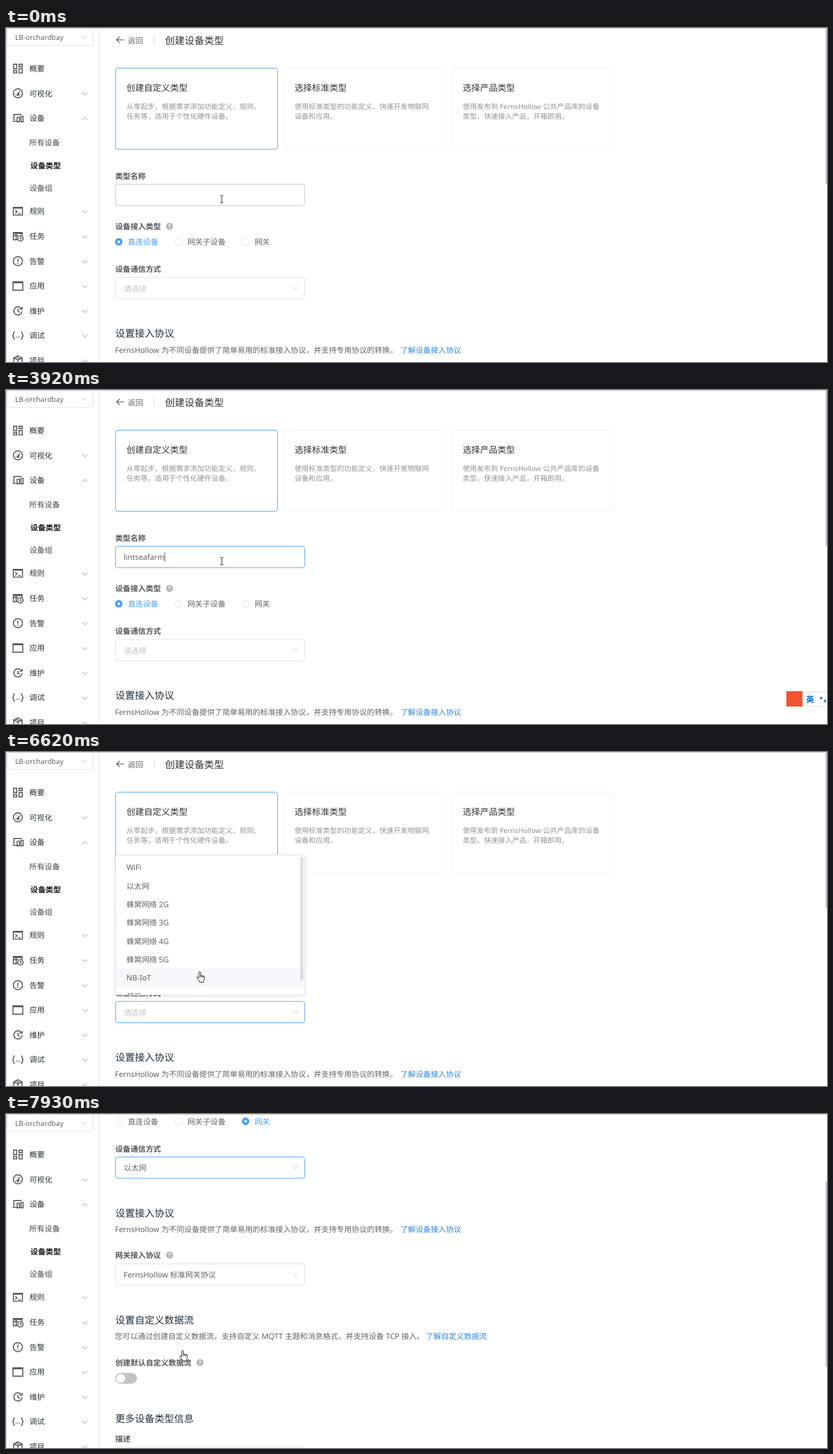
An HTML page for the animation above (8000 ms loop, 1172 by 478 pixels).

```html
<!DOCTYPE html>
<html lang="zh-CN">
<head>
<meta charset="utf-8">
<title>创建设备类型</title>
<style>
html, body { margin: 0; width: 100%; height: 100%; overflow: hidden; background: #fff; }
svg { display: block; width: 1172px; height: 478px; }
text { font-family: "Noto Sans", "Noto Sans CJK SC", "Noto Sans CJK", sans-serif; text-rendering: geometricPrecision; white-space: pre; }
</style>
</head>
<body>
<svg id="stage" viewBox="0 0 1172 478" xmlns="http://www.w3.org/2000/svg"></svg>
<script>
const LOOP = 8000;
const BLUE = '#409eff', LINK = '#2f86e0', TEXT = '#606266', DARK = '#303133';
const MUTED = '#8f9297', PALE = '#c0c4cc', LINE = '#dcdfe6';
const SIZE = 10.89;
const NAME = 'lintseafarm';
const BRAND = 'FernsHollow';

// Moments at which the screen refreshes.
const TICKS = [0, 150, 280, 580, 1180, 1330, 1480, 1760, 2060, 2650, 3090, 3370, 3510, 3800, 3920,
  4540, 4690, 4840, 4990, 5150, 5300, 5460, 5610, 5760, 5910, 6190, 6330, 6480, 6620, 6770, 6910,
  7060, 7200, 7350, 7480, 7630, 7780, 7930];

// Vertically centred text.
const text = (x, cy, str, { size = SIZE, fill = TEXT, bold = false, id = '' } = {}) =>
  `<text ${id && `id="${id}"`} x="${x}" y="${cy + size * 0.38}" font-size="${size}" fill="${fill}"${bold ? ' font-weight="700"' : ''}>${str}</text>`;
const label = (cy, str) => text(156, cy, str, { bold: true, fill: '#55575c' });
const heading = (cy, str) => text(156, cy, str, { size: 14, fill: '#1f2f3d' });
const link = (x, cy, str) => text(x, cy, str, { fill: LINK });
const box = (x, y, w, h, stroke, id = '', r = 3) =>
  `<rect ${id && `id="${id}"`} x="${x}" y="${y}" width="${w}" height="${h}" rx="${r}" fill="#fff" stroke="${stroke}" stroke-width=".85"/>`;
const chevron = (x, y, up = false, color = MUTED, id = '') =>
  `<path ${id && `id="${id}"`} d="M-3.7 -1.8L0 1.8L3.7 -1.8" transform="translate(${x} ${y}) scale(1 ${up ? -1 : 1})" fill="none" stroke="${color}" stroke-width=".9"/>`;
const help = (x, y) => `<circle cx="${x}" cy="${y}" r="5" fill="#b4b5b8"/>` +
  `<text x="${x}" y="${y + 3}" font-size="8" font-weight="700" fill="#fff" text-anchor="middle">?</text>`;

function card(x, title, lines, active) {
  return box(x, 57.5, 231.3, 116.2, active ? '#4a9ff0' : '#f0f1f4') +
    text(x + 15.7, 85.5, title, { size: 12.44, fill: DARK }) +
    lines.map((s, i) => text(x + 15.7, 112 + i * 14.3, s, { size: 10.11, fill: MUTED })).join('');
}

const radios = [[161, '直连设备'], [246, '网关子设备'], [342, '网关']];
const radio = ([x, str], i) =>
  `<circle id="ring${i}" cx="${x}" cy="306" r="5" stroke-width=".85"/><circle id="dot${i}" cx="${x}" cy="306" r="2" fill="#fff"/>` +
  text(x + 13, 306, str, { id: `choice${i}` });

// Sidebar icons, centred on the origin.
const icons = {
  board: '<path d="M-6.2 -6.2h4.6v6.4h-4.6zM-6.2 3h4.6v3.4h-4.6zM1.6 -6.2h4.6v3.4h-4.6zM1.6 0h4.6v6.4h-4.6z"/>',
  gauge: '<circle r="6.5"/><path d="M-4 1.5h.8M3.2 1.5h.8M-2.6 -2.6l.5 .5M0 -4v.6M2.8 -2.8L0 1.5" /><circle cy="2" r="1.3"/>',
  devices: '<path d="M5.5 -5.2H-5.7V3.5M-7.5 4.6H-1.5M-1 -1.4H2.4V5.3H-1zM4.4 -2.6H7.4V5.3H4.4z"/>',
  console: '<path d="M-6.5 -5.6H6.5V5.6H-6.5zM-6.5 -4.5H6.5M-3.8 -1.6L-1.2 .8L-3.8 3.2M.5 3.3H4"/>',
  schedule: '<path d="M6 -1V-5.2H-6.5V5H-1M-6.5 -4H6M-6.5 -1H0M-2.5 -5V5"/><circle cx="3.5" cy="3" r="3.9" fill="#fff"/><path d="M3.5 .8V3.2L5.1 4.2"/>',
  alert: '<circle r="6.5"/><path d="M0 -3.6V1M0 2.4V3.9"/>',
  window: '<path d="M-7 -6H7V6H-7zM-7 -4.6H7"/>',
  upkeep: '<path d="M4.4 -3.9A5.9 5.9 0 1 0 5.9 .8M6 -6V-2.6H2.4M0 -3V.6L2.6 2"/>',
  braces: '<path d="M-4.5 -5.6C-7 -5.6 -5.4 -.4 -7.8 0C-5.4 .4 -7 5.6 -4.5 5.6M4.5 -5.6C7 -5.6 5.4 -.4 7.8 0C5.4 .4 7 5.6 4.5 5.6M-3 2.2h1.2M-.6 2.2h1.2M1.8 2.2h1.2"/>',
  cube: '<path d="M0 -6.6L6 -3.6V3.6L0 6.6L-6 3.6V-3.6zM-6 -3.6L0 -.6L6 -3.6M0 -.6V6.6M-3 -5.1L3 -2.1"/>'
};
const menu = [['board', '概要', 58], ['gauge', '可视化', 93.5], ['devices', '设备', 129], ['console', '规则', 262.3],
  ['schedule', '任务', 298], ['alert', '告警', 333.7], ['window', '应用', 369.2], ['upkeep', '维护', 404.8],
  ['braces', '调试', 440.2], ['cube', '项目', 475.7]];

const sidebar = `<rect width="132" height="478" fill="#fff"/><path d="M132.5 0V478" stroke="#e4e5e8"/>` +
  box(1.5, -6.5, 123, 31.5, LINE) +
  text(13, 13, 'LB-orchardbay', { size: 10.11 }) + chevron(111.5, 13, false, PALE) +
  menu.map(([icon, str, y]) =>
    `<g transform="translate(17 ${y})" fill="none" stroke="#505257" stroke-width="1.4">${icons[icon]}</g>` +
    text(33.5, y, str, { fill: '#25302f' }) +
    (icon === 'board' ? '' : chevron(112.5, y + 0.7, icon === 'devices'))).join('') +
  text(33.3, 164, '所有设备', { fill: '#45474c' }) +
  text(34.8, 197, '设备类型', { fill: '#16191d', bold: true }) +
  text(33.5, 229, '设备组', { fill: '#45474c' });

const options = ['WiFi', '以太网', '蜂窝网络 2G', '蜂窝网络 3G', '蜂窝网络 4G', '蜂窝网络 5G', 'NB-IoT', '蓝牙'];
const optionY = i => 165.3 + i * 26.3;
const dropdown = `<g id="dropdown">
  <rect x="156.5" y="147.5" width="270" height="200" rx="3" fill="#fff" stroke="#e4e7ed" filter="url(#shadow)"/>
  <g clip-path="url(#panel)"><rect id="hover" x="157" width="269" height="26.3" fill="#f5f7fa"/>
  ${options.map((s, i) => text(172, optionY(i), s)).join('')}</g>
  <rect x="420" y="150" width="4.5" height="177" rx="2.2" fill="#dddee1"/></g>`;

const page = `<g id="page">
  <path d="M168 17H158M162.3 12.6L157.9 17L162.3 21.4" fill="none" stroke="#505257" stroke-width="1.1"/>
  ${text(174, 17.5, '返回')}
  <path d="M211.5 11V23.5" stroke="${LINE}"/>
  ${text(227, 17.5, '创建设备类型', { size: 14, fill: DARK })}
  ${card(156.3, '创建自定义类型', ['从零起步，根据需求添加功能定义、规则、', '任务等，适用于个性化硬件设备。'], true)}
  ${card(396.2, '选择标准类型', ['使用标准类型的功能定义，快速开发物联网', '设备和应用。'])}
  ${card(636.2, '选择产品类型', [`使用发布到 ${BRAND} 公共产品库的设备`, '类型，快速接入产品，开箱即用。'])}
  ${label(212, '类型名称')}
  ${box(156.3, 223.6, 270, 30.6, LINE, 'nameBox')}
  ${text(168, 239.3, '', { id: 'typed' })}
  <rect id="caret" y="232.5" width="1" height="13" fill="#55575c"/>
  ${label(284, '设备接入类型')}${help(233.5, 284)}
  ${radios.map(radio).join('')}
  ${label(345, '设备通信方式')}
  ${box(156.3, 357, 270, 30.5, LINE, 'linkBox')}
  ${text(168, 372.5, '', { id: 'linkValue' })}
  ${chevron(413.5, 372.3, false, PALE, 'linkArrow')}
  ${heading(436.8, '设置接入协议')}
  ${text(155.5, 460.7, `${BRAND} 为不同设备提供了简单易用的标准接入协议，并支持专用协议的转换。`)}
  ${link(563, 460.7, '了解设备接入协议')}
  ${label(497.8, '网关接入协议')}${help(233.5, 497.5)}
  ${box(156.3, 510, 270, 30.5, LINE)}
  ${text(168, 525.7, `${BRAND} 标准网关协议`)}${chevron(413.5, 525.5, false, PALE)}
  ${heading(590.2, '设置自定义数据流')}
  ${text(155.5, 613.7, '您可以通过创建自定义数据流，支持自定义 MQTT 主题和消息格式，并支持设备 TCP 接入。')}
  ${link(599.5, 613.7, '了解自定义数据流')}
  ${label(651.7, '创建默认自定义数据流')}${help(277, 651.3)}
  <rect x="156" y="666" width="31" height="15.5" rx="7.75" fill="#c0c1c4"/><circle cx="163.8" cy="673.75" r="6.3" fill="#fff"/>
  ${heading(731, '更多设备类型信息')}
  ${label(760, '描述')}
  ${box(156.3, 772, 270, 60, LINE)}
</g>`;

const ime = `<g id="ime"><rect x="1128" y="432.5" width="60" height="20.5" rx="3" fill="#fff" stroke="#dfe1e4"/>
  <rect x="1114" y="431" width="23" height="22" fill="#f1552e"/>
  ${text(1142, 443, '英', { size: 11.5, fill: '#0a6fd2', bold: true })}
  <circle cx="1163.7" cy="441" r="1.7" fill="#0a6fd2"/><path d="M1168.2 443.2h2.8l-1.2 4h-1.6z" fill="#0a6fd2"/></g>`;

const pointers = `<g id="pointer" stroke-linejoin="round">
  <path id="beam" d="M-2.3 -5.2H-.6L0 -4.6L.6 -5.2H2.3M0 -4.6V4.6M-2.3 5.2H-.6L0 4.6L.6 5.2H2.3" fill="none" stroke="#333"/>
  <path id="arrow" d="M.3 .3V11.2L2.8 8.9L4.4 12.5L6 11.8L4.5 8.2H7.8z" fill="#fff" stroke="#222" stroke-width=".9"/>
  <path id="hand" d="M-1.2 9V1a1.2 1.2 0 0 1 2.4 0V5.2L3 5.4L5 5.9L6.8 6.6V10.2L5.6 13V15H-.2V13.6L-3.6 9.2C-4.4 7.8 -3 6.8 -2.1 7.8zM1.2 5.2V8M3.1 5.5V8M5 6V8.3" fill="#fff" stroke="#222" stroke-width=".9"/>
</g>`;

document.getElementById('stage').innerHTML = `<defs>
  <clipPath id="panel"><rect x="157" y="148" width="269" height="199"/></clipPath>
  <filter id="shadow" x="-5%" y="-5%" width="110%" height="115%"><feDropShadow dx="0" dy="1.5" stdDeviation="3" flood-opacity=".1"/></filter>
  </defs><rect width="1172" height="478" fill="#fff"/>${page}${dropdown}${sidebar}
  <rect id="thumb" x="1170" width="2" height="265" fill="#c1c2c4"/>
  <path d="M0 .5H1172M.5 0V478" stroke="#c6c7c9"/>${ime}${pointers}`;

const el = {};
document.querySelectorAll('#stage [id]').forEach(node => el[node.id] = node);
const set = (id, attrs) => { for (const k in attrs) el[id].setAttribute(k, attrs[k]); };
const show = (id, on) => set(id, { visibility: on ? 'visible' : 'hidden' });
const within = (t, a, b) => t >= a && t < b;
const last = (list, t) => list.findLast(item => item[0] <= t);

// Linear path through [time, ...values].
function along(keys, t) {
  const i = keys.findIndex(k => k[0] > t);
  if (i < 0) return keys.at(-1).slice(1);
  if (i === 0) return keys[0].slice(1);
  const a = keys[i - 1], b = keys[i], u = (t - a[0]) / (b[0] - a[0]);
  return a.slice(1).map((v, j) => v + (b[j + 1] - v) * u);
}

const letters = [[0, 0], [1330, 1], [1480, 2], [1760, 3], [2060, 4], [3090, 6], [3370, 7], [3510, 8], [3800, 10], [3920, 11]];
const pointerPath = [[4540, 308, 245], [5150, 342, 306.5], [5460, 342, 306.5], [5910, 290, 367], [6190, 288, 367],
  [6330, 286, 360], [6620, 276.5, 314.5], [6910, 248, 187], [7060, 248, 190], [7350, 252, 338.5]];
const pointerKind = [[0, 'beam'], [4840, 'arrow'], [5150, 'hand'], [5610, 'arrow'], [5910, 'hand'], [7060, 'arrow'], [7930, 'hand']];
const scrollPath = [[7500, 0], [7630, 10], [7780, 145], [7930, 295.5]];
const dropPath = [[6100, 0], [6400, 1], [6910, 1], [7180, 0]];

function render(now) {
  const t = TICKS.findLast(tick => tick <= now);

  el.typed.textContent = NAME.slice(0, last(letters, t)[1]);
  set('caret', { x: 168 + el.typed.getComputedTextLength() });
  show('caret', within(t, 150, 580) || within(t, 1180, 2650) || within(t, 3090, 4540) || within(t, 4990, 5300));
  set('nameBox', { stroke: t < 150 ? PALE : t < 5460 ? BLUE : LINE });
  show('ime', within(t, 150, 5300));

  const chosen = t < 5460 ? 0 : 2;
  radios.forEach((_, i) => {
    const on = i === chosen, hot = i === 2 && within(t, 5150, 5460);
    set(`ring${i}`, { fill: on ? BLUE : '#fff', stroke: on || hot ? BLUE : LINE });
    show(`dot${i}`, on);
    set(`choice${i}`, { fill: on ? BLUE : TEXT });
  });

  const picked = t >= 6910;
  el.linkValue.textContent = picked ? '以太网' : '请选择';
  set('linkValue', { fill: picked ? TEXT : PALE });
  set('linkBox', { stroke: t >= 6190 ? BLUE : t >= 5910 ? PALE : LINE });
  set('linkArrow', { transform: `translate(413.5 372.3) scale(1 ${within(t, 6190, 6910) ? -1 : 1})` });

  const [x, y] = along(pointerPath, t);
  set('pointer', { transform: `translate(${x} ${y})` });
  const kind = last(pointerKind, t)[1];
  ['beam', 'arrow', 'hand'].forEach(id => show(id, id === kind));

  const [open] = along(dropPath, t);
  set('dropdown', { opacity: open, transform: `translate(0 ${347.5 * (1 - open)}) scale(1 ${open})` });
  const row = Math.round((y + 5 - optionY(0)) / 26.3);
  set('hover', { y: optionY(row) - 13.15 });
  show('hover', open > 0 && row >= 0 && row < options.length);

  const [scroll] = along(scrollPath, t);
  set('page', { transform: `translate(0 ${-scroll})` });
  set('thumb', { y: -42 + 0.47 * scroll });
}

const start = performance.now();
function frame() {
  render((performance.now() - start) % LOOP);
  requestAnimationFrame(frame);
}
frame();
</script>
</body>
</html>
```
